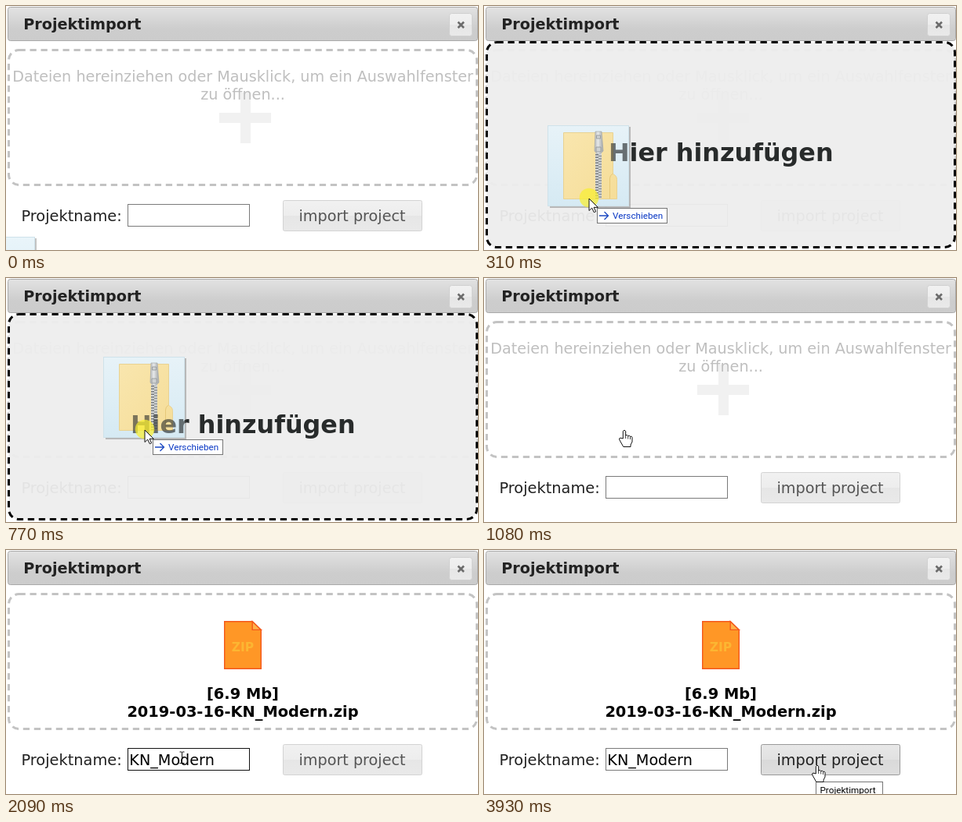
These frames come from a looping animation (602 by 313 pixels, 4160 ms). An HTML page:

```html
<!DOCTYPE html>
<html lang="de">
<head>
<meta charset="utf-8">
<title>Projektimport</title>
<style>
  html, body { margin: 0; width: 100%; height: 100%; overflow: hidden; background: #fff; }
  svg { display: block; width: 602px; height: 313px; }
  text { font: 19.2px "DejaVu Sans", sans-serif; fill: #222; white-space: pre; }
  .label { font-size: 19.4px; }
  .bold { font-weight: bold; }
  .mid { text-anchor: middle; }
  .hint { fill: #bfbfbf; }
  .info { font-size: 19.4px; font-weight: bold; fill: #000; }
  .drop { font-size: 31.8px; font-weight: bold; fill: #282b2b; }
  .tip { font: 11.7px Roboto, "Open Sans", sans-serif; }
  .dash { fill: none; stroke-width: 3; stroke-dasharray: 8.3 5.7; }
  .pointer { fill: #fff; stroke: #111; stroke-linejoin: round; }
</style>
</head>
<body>
<svg viewBox="0 0 602 313">
  <defs>
    <linearGradient id="bar" x2="0" y2="1">
      <stop stop-color="#e2e2e2"/><stop offset=".65" stop-color="#cdcdcd"/><stop offset="1" stop-color="#ccc"/>
    </linearGradient>
    <linearGradient id="plain" x2="0" y2="1">
      <stop stop-color="#f1f1f1"/><stop offset=".5" stop-color="#ededed"/>
      <stop offset=".5" stop-color="#e6e6e6"/><stop offset="1" stop-color="#e9e9e9"/>
    </linearGradient>
    <linearGradient id="hover" x2="0" y2="1">
      <stop stop-color="#e8e8e8"/><stop offset=".5" stop-color="#e1e1e1"/>
      <stop offset=".5" stop-color="#d9d9d9"/><stop offset="1" stop-color="#dedede"/>
    </linearGradient>
    <linearGradient id="glass" x2="0" y2="1">
      <stop stop-color="#e6f3f9"/><stop offset="1" stop-color="#d2e9f4"/>
    </linearGradient>
    <linearGradient id="paper" x2="1" y2="1">
      <stop stop-color="#f9e6ae"/><stop offset="1" stop-color="#f5dd98"/>
    </linearGradient>
    <linearGradient id="metal">
      <stop stop-color="#b4b7b9"/><stop offset=".4" stop-color="#e6e8e9"/><stop offset="1" stop-color="#a0a4a6"/>
    </linearGradient>
    <clipPath id="ghostClip"><rect id="ghostArea" width="104" height="104"/></clipPath>
  </defs>

  <rect x="2.5" y="1.5" width="599" height="43" rx="3" fill="url(#bar)" stroke="#aaa"/>
  <text x="22.2" y="30" class="bold">Projektimport</text>
  <rect x="565.5" y="9.5" width="29" height="29" rx="3" fill="url(#plain)" stroke="#d0d0d0"/>
  <path d="M576.5 20.5l7.5 7.5m0-7.5l-7.5 7.5" stroke="#6c6c6c" stroke-width="2.6"/>

  <rect x="3.5" y="56.5" width="597" height="173" rx="13" class="dash" stroke="#c3c3c3"/>
  <g id="prompt">
    <path d="M272 143.5h66M305.5 111v65" stroke="#f1f1f1" stroke-width="13"/>
    <text x="302" y="97" class="hint mid">Dateien hereinziehen oder Mausklick, um ein Auswahlfenster</text>
    <text x="302" y="120" class="hint mid">zu öffnen...</text>
  </g>
  <g id="file">
    <path d="M278.7 91.7h35.5l11.1 11v49.6h-46.6z" fill="#ff9726" stroke="#f4581c" stroke-width="1.4"/>
    <path d="M314.2 91.7v10.7h11.1z" fill="#ffb24a" stroke="#f4581c" stroke-width="1.4"/>
    <text x="302" y="130" class="bold mid" style="font-size:15.5px;fill:#fcb632">ZIP</text>
    <text x="302" y="191" class="info mid">[6.9 Mb]</text>
    <text x="302" y="214" class="info mid">2019-03-16-KN_Modern.zip</text>
  </g>

  <text x="19.4" y="276" class="label">Projektname:</text>
  <rect id="field" x="155.5" y="254.5" width="155" height="28" fill="#fff"/>
  <text id="name" x="157.3" y="276" style="fill:#000">KN_Modern</text>
  <rect id="button" x="353.5" y="249.5" width="177" height="39" rx="2"/>
  <text id="caption" x="441.5" y="276" class="mid">import project</text>

  <g id="overlay">
    <rect x="3.5" y="46.5" width="597" height="263" rx="13" fill="#eee" opacity=".95"/>
    <rect x="3.5" y="46.5" width="597" height="263" rx="13" class="dash" stroke="#000"/>
    <text x="302.3" y="199" class="drop mid">Hier hinzufügen</text>
  </g>

  <!-- dragged archive, placed relative to the pointer tip -->
  <g id="drag">
    <g transform="translate(-53 -94)">
      <path d="M105 2v103H3" fill="none" stroke="#555" stroke-width="2" opacity=".35"/>
      <rect x=".5" y=".5" width="103" height="103" fill="url(#glass)" fill-opacity=".88" stroke="#cfe2ea"/>
      <g id="archive">
        <path d="M20.5 9.5h63v53q5 2 5 7v25h-68z" fill="url(#paper)" stroke="#e8d293"/>
        <path d="M79.5 94V68q0-4 4-6" fill="none" stroke="#e6c878"/>
        <path d="M65 36v58" stroke="#d6d8d9" stroke-width="8"/>
        <path d="M63 37v57" stroke="#777b7d" stroke-width="4" stroke-dasharray="1.5 2"/>
        <path d="M67 38.7v55" stroke="#8b8f91" stroke-width="4" stroke-dasharray="1.5 2"/>
        <path d="M61 8h8l2 25q-6 8-11 0z" fill="url(#metal)" stroke="#a5a9ab" stroke-width=".7"/>
        <path d="M62.500 13h5v4h-5zM62 28h6v6h-6z" fill="#cfd2d3" stroke="#8f9395" stroke-width=".8"/>
      </g>
    </g>
    <text id="through" x="302.3" y="199" class="drop mid" opacity=".6" clip-path="url(#ghostClip)">Hier hinzufügen</text>
    <circle cy="-1" r="12.3" fill="#f8ef30" opacity=".72"/>
    <g transform="translate(10 12)">
      <rect x=".5" y=".5" width="89" height="19" fill="#fff" stroke="#767676"/>
      <path d="M3 10h11M9.500 5l5 5l-5 5" fill="none" stroke="#1c49c2" stroke-width="1.3"/>
      <text x="20" y="14" class="tip" style="fill:#0a38c4">Verschieben</text>
    </g>
  </g>

  <g id="tooltip">
    <rect x=".5" y="21.5" width="85" height="20" fill="#fff" stroke="#767676"/>
    <text x="5.5" y="36" class="tip" style="fill:#000">Projektimport</text>
  </g>

  <path id="arrow" class="pointer" d="M0 0v15.500l3.700-3.400l2.600 5.600l2.300-1l-2.500-5.400h5.200z"/>
  <g id="hand">
    <path class="pointer" d="M.300 11V1.500q1.700-2.700 3.400 0V7q1.600-1.500 3 .600q1.600-1.200 2.800 .700q2-.800 2.500 1.200v5.500l-2 4v2.500H.800L-4 13q-1.500-2.700 1-2.900z"/>
    <path d="M3.700 7v4m3-3.400V11.500m2.800-3V12" stroke="#111" stroke-width=".8"/>
  </g>
  <path id="beam" d="M-3 -7.500h2.500l.500 .500l.500-.500H3M0-7V6.500M-3 7h2.500l.500-.500l.500 .500H3" fill="none" stroke="#111"/>
</svg>

<script>
const LOOP = 4160;
const el = id => document.getElementById(id);

// [time, x, y] of the pointer tip; each position holds until the next
const path = [
  [0, -14, 390], [80, 33, 341], [150, 75, 302], [230, 111, 270], [310, 134, 247],
  [380, 149, 231], [460, 160, 220], [540, 168, 212],
  [620, 173, 204], [690, 176, 198], [770, 177, 195],
  [1780, 181, 200], [1850, 190, 215], [1930, 203, 239], [2010, 216, 259], [2090, 224, 267],
  [2550, 231, 271], [2620, 256, 283], [2700, 293, 295], [2780, 339, 301], [2860, 377, 302],
  [2930, 397, 301], [3010, 409, 298], [3090, 415, 292], [3170, 419, 286],
  [3240, 422, 281], [3320, 423, 278], [3400, 423, 276]
];

const within = (v, from, to) => v >= from && v < to;
const show = (id, on) => el(id).setAttribute("display", on ? "inline" : "none");
const set = (id, attrs) => {
  for (const key in attrs) el(id).setAttribute(key, attrs[key]);
};
const place = (id, on, x, y) => {
  show(id, on);
  set(id, { transform: `translate(${x} ${y})` });
};

function draw(t) {
  const [, x, y] = path.findLast(p => p[0] <= t);
  const dragging = t < 1080;
  const loaded = t >= 1230;
  const overZone = within(y, 55, 231);
  const overField = within(x, 155, 311) && within(y, 254, 283);
  const overButton = within(x, 353, 531) && within(y, 249, 289);
  const useHand = !dragging && (overZone || overButton);
  const useBeam = !dragging && overField;

  show("prompt", !loaded);
  show("file", loaded);
  show("name", t >= 1310);
  show("overlay", within(t, 150, 1080));
  show("through", within(t, 150, 1080));
  show("archive", t >= 80);

  set("field", { stroke: useBeam ? "#111" : "#7a7a7a" });
  const hot = !dragging && overButton;
  set("button", { fill: `url(#${hot ? "hover" : "plain"})`, stroke: hot ? "#999" : "#d3d3d3" });
  el("caption").style.fill = hot ? "#212121" : "#555";

  place("drag", dragging, x, y);
  set("through", { transform: `translate(${-x} ${-y})` });
  set("ghostArea", { x: x - 53, y: y - 94 });
  place("tooltip", within(t, 1630, 1780) || t >= 3930, x, y);
  place("arrow", !useHand && !useBeam, x, y);
  place("hand", useHand, x, y);
  place("beam", useBeam, x + 0.5, y - 0.5);
}

function tick() {
  draw(performance.now() % LOOP);
  requestAnimationFrame(tick);
}
tick();
</script>
</body>
</html>
```
